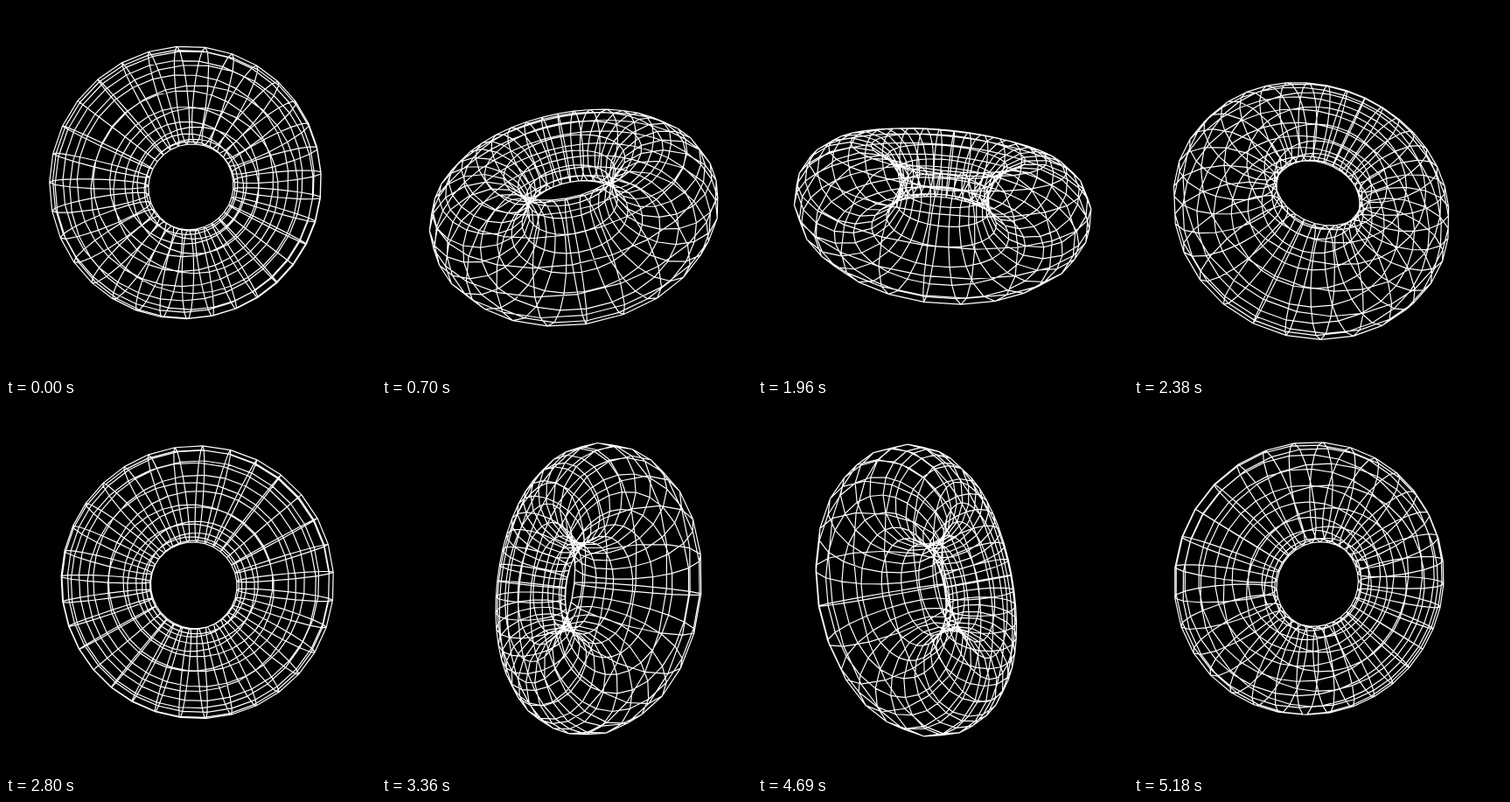
Write an HTML page with a canvas that moves like this. It is 423 px wide and 423 px high and loops after 5250 ms.

```html
<!DOCTYPE html>
<html lang="en">
<head>
<meta charset="utf-8">
<title>Wireframe torus</title>
<style>
  html, body { margin: 0; width: 100%; height: 100%; overflow: hidden; background: #000; }
  canvas { display: block; }
</style>
</head>
<body>
<canvas id="stage" width="423" height="423"></canvas>
<script>
const ctx = document.getElementById('stage').getContext('2d');

const SIZE = 423, STEP_MS = 70, STEPS = 75;
const CX = 213.5, CY = 208.3;        // projected centre
const FOCAL = 300, DISTANCE = 6;     // perspective
const RING = 2, TUBE = 1;            // torus radii
const RING_SEGS = 32, TUBE_SEGS = 16;
const START = -7.3 * Math.PI / 180;  // angle at time zero

// Turn the pair (a, b) by the angle with cosine c and sine s.
const turn = (a, b, c, s) => [a * c - b * s, a * s + b * c];

function project(i, j, c, s) {
  const u = i / RING_SEGS * 2 * Math.PI;
  const v = j / TUBE_SEGS * 2 * Math.PI;
  const r = RING + TUBE * Math.cos(v);
  let x = r * Math.cos(u), y = r * Math.sin(u), z = TUBE * Math.sin(v);
  [z, x] = turn(z, x, c, s);   // about y
  [y, z] = turn(y, z, c, s);   // about x
  [x, y] = turn(x, y, c, s);   // about z
  const k = FOCAL / (DISTANCE - z);
  return [CX + x * k, CY - y * k];
}

function loop(points) {
  points.forEach(([x, y], i) => i ? ctx.lineTo(x, y) : ctx.moveTo(x, y));
  ctx.closePath();
}

function draw(step) {
  const angle = -(START + step / STEPS * 2 * Math.PI);
  const c = Math.cos(angle), s = Math.sin(angle);
  const grid = Array.from({ length: RING_SEGS }, (_, i) =>
    Array.from({ length: TUBE_SEGS }, (_, j) => project(i, j, c, s)));

  ctx.fillStyle = '#000';
  ctx.fillRect(0, 0, SIZE, SIZE);
  ctx.strokeStyle = '#fff';
  ctx.lineWidth = 1.2;
  ctx.lineJoin = 'round';
  ctx.beginPath();
  grid.forEach(loop);
  for (let j = 0; j < TUBE_SEGS; j++) loop(grid.map(row => row[j]));
  ctx.stroke();
}

function tick() {
  draw(Math.floor(performance.now() / STEP_MS) % STEPS);
  requestAnimationFrame(tick);
}
tick();
</script>
</body>
</html>
```
